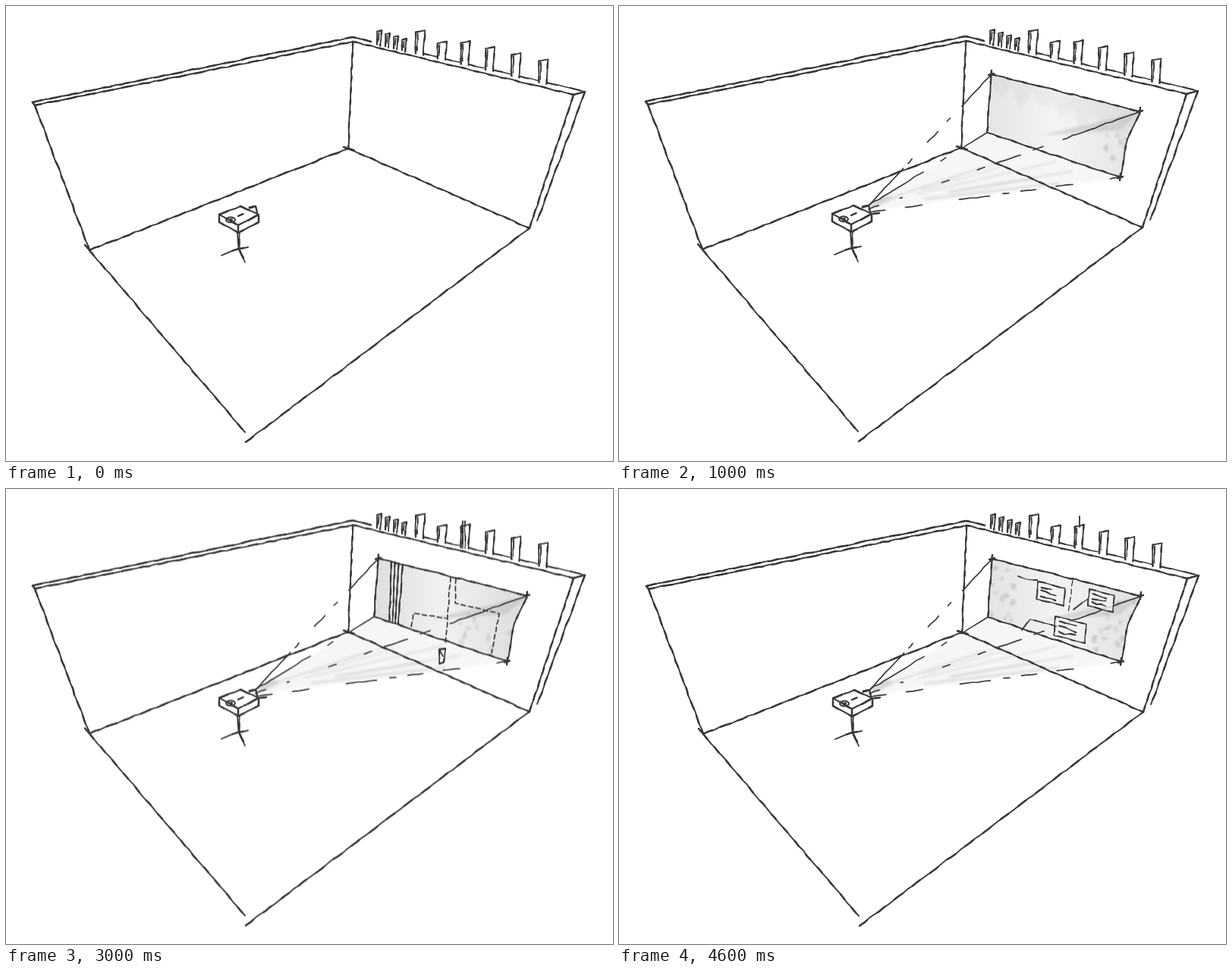
An HTML page for the animation above (5 s loop, 800 by 600 pixels).

```html
<!DOCTYPE html>
<html lang="en">
<head>
<meta charset="utf-8">
<title>Projector room sketch</title>
<style>
  html, body { margin: 0; width: 100%; height: 100%; overflow: hidden; background: #fff; }
  svg { display: block; width: 100vw; height: 100vh; }
  .ink { fill: none; stroke: #383838; stroke-linecap: round; stroke-linejoin: round; }
  .soft { filter: url(#blur); }
  .scene { opacity: 0; animation: show 5s step-end infinite; animation-delay: calc(var(--i) * 1s); }
  @keyframes show { 0% { opacity: 1; } 20%, 100% { opacity: 0; } }
</style>
</head>
<body>
<svg viewBox="0 0 800 600">
  <defs>
    <filter id="blur" x="-10%" y="-10%" width="120%" height="120%"><feGaussianBlur stdDeviation="1.6"/></filter>
    <clipPath id="screen"><path/></clipPath>
    <linearGradient id="wash">
      <stop offset="0" stop-color="#dedede"/><stop offset=".45" stop-color="#f1f1f1"/><stop offset="1" stop-color="#dcdcdc"/>
    </linearGradient>
    <g id="room"></g>
    <g id="beam"></g>
    <g id="rays" class="soft"></g>
    <g id="peaks" class="soft"></g>
  </defs>

  <g class="scene" style="--i:0"><use href="#room"/></g>

  <g class="scene" style="--i:1" transform="translate(0 -1)">
    <use href="#rays"/>
    <g id="hills" clip-path="url(#screen)"><use href="#peaks"/></g>
    <use href="#room"/><use href="#beam"/>
  </g>

  <g class="scene" style="--i:2" transform="translate(-1 -.5)">
    <use href="#rays" opacity=".35"/>
    <g id="patches" clip-path="url(#screen)"></g>
    <use href="#room"/><use href="#beam"/>
    <g id="bars"></g>
  </g>

  <g class="scene" style="--i:3" transform="translate(0 .5)">
    <use href="#rays"/>
    <g id="shade" clip-path="url(#screen)"><use href="#peaks"/><use href="#peaks" opacity=".6"/></g>
    <use href="#room"/><use href="#beam"/>
    <g id="plan"></g>
  </g>

  <g class="scene" style="--i:4" transform="translate(1 1)">
    <use href="#rays"/>
    <g id="dabs" clip-path="url(#screen)"></g>
    <use href="#room"/><use href="#beam"/>
    <g id="notes"></g>
  </g>
</svg>
<script>
const byId = id => document.getElementById(id);
let seed = 11;
const rand = () => (seed = seed * 16807 % 2147483647) / 2147483647;
const between = (a, b) => a + (b - a) * rand();
const mix = (p, q, t) => [p[0] + (q[0] - p[0]) * t, p[1] + (q[1] - p[1]) * t];
const shift = ([x, y], dx, dy) => [x + dx, y + dy];
const pathOf = points => "M" + points.map(p => p.map(v => v.toFixed(1)).join(" ")).join("L");

function add(id, tag, attrs) {
  const el = document.createElementNS("http://www.w3.org/2000/svg", tag);
  for (const key in attrs) el.setAttribute(key, attrs[key]);
  byId(id).append(el);
}

// A slightly shaky pen stroke through the points, with uneven pressure.
function ink(id, points, width = 1.8, dash = "") {
  const out = [points[0]];
  for (let i = 1; i < points.length; i++) {
    const a = points[i - 1], b = points[i];
    const n = Math.max(1, Math.round(Math.hypot(b[0] - a[0], b[1] - a[1]) / 8));
    for (let k = 1; k <= n; k++) {
      const wobble = k < n ? 0.6 : 0;
      out.push(shift(mix(a, b, k / n), between(-wobble, wobble), between(-wobble, wobble)));
    }
  }
  const d = pathOf(out);
  add(id, "path", { d, class: "ink", "stroke-width": width, "stroke-dasharray": dash });
  if (!dash) add(id, "path", { d, class: "ink", "stroke-width": width + 0.6,
    "stroke-dasharray": `${between(5, 14)} ${between(8, 18)}` });
}
const fill = (id, points, color, opacity = 1) =>
  add(id, "path", { d: pathOf(points), fill: color, opacity, class: "soft" });

// Corners of the room
const left = [38, 131], leftRim = [35, 127], leftFloor = [110, 322];
const back = [457, 47], backRim = [457, 41], backFloor = [451, 188];
const right = [748, 117], rightRim = [763, 113], rightFloor = [690, 293];
const front = [315, 562];

for (const line of [
  [leftRim, backRim, shift(backRim, 24, 6)], [leftRim, left, back], [left, leftFloor],
  [leftFloor, backFloor], [back, backFloor], [backFloor, rightFloor], [leftFloor, front],
  [shift(front, 1, 13), rightFloor], [back, right], [right, rightFloor], [right, rightRim],
  [rightRim, [700, 283]], [shift(leftFloor, -6, -7), leftFloor], [shift(backFloor, -6, -2), shift(backFloor, 8, 2)]
]) ink("room", line, 1.9);

// Pillars stand on the right rim, which shows between them.
const rimY = x => 41 + (x - 457) * 0.235;
function pillar(x, w, h) {
  const base = rimY(x) + 2, top = base - h;
  ink("room", [[x, base], [x, top], [x + w, top - w / 5], [x + w - 2, base + 2]]);
  ink("room", [[x + 2.5, top + 2], [x + 2, base - 4]], 1.2);
}
for (let i = 0; i < 4; i++) pillar(489 + 11 * i, 6, 17 - i);
for (let i = 0; i < 6; i++) {
  const place = n => 540 + 28 * n + 0.9 * n * n;
  const x = place(i), next = i < 5 ? place(i + 1) : rightRim[0];
  pillar(x, 12, i === 1 ? 20 : 28);
  ink("room", [[x + 11, rimY(x + 11)], [next - 2, rimY(next - 2)]], 1.5);
}

// Projector on its stand
const west = [281, 275], north = [309, 264], east = [333, 275], south = [306, 289];
const down = p => shift(p, 0, 10);
ink("room", [west, north, east, south, west, down(west), down(south), down(east), east], 2);
ink("room", [south, down(south)], 2);
add("room", "ellipse", { cx: 296, cy: 282, rx: 6, ry: 3.5, class: "ink", "stroke-width": 2 });
add("room", "circle", { cx: 297, cy: 282, r: 2, fill: "#383838" });
ink("room", [[306, 277], [313, 274]]);
ink("room", [[321, 266], [329, 264], [331, 272]], 2.4);
const hub = [307, 320];
for (const end of [[305, 298], [308, 298], [284, 329], [319, 318], [315, 338], [313, 332]]) ink("room", [hub, end]);

// Projected picture: u runs along it, v runs down it.
const TL = [491, 91], TR = [687, 140], BR = [661, 227], BL = [485, 168];
const on = (u, v) => mix(mix(TL, TR, u), mix(BL, BR, u), v);
const frame = [TL, TR, on(0.97, 0.45), BR, BL];
document.querySelector("#screen path").setAttribute("d", pathOf(frame));
ink("beam", [...frame, TL], 1.9);
for (const c of [TL, TR, BR]) {
  ink("beam", [shift(c, -4, 1), shift(c, 3, -1)]);
  ink("beam", [shift(c, 0, -5), shift(c, -1, 4)]);
}

// Light rays from the lens to the corners
const lens = [329, 264];
ink("beam", [lens, TL], 1.7, "67 9 8 30 20 18 6 22");
ink("beam", [lens, BL], 1.6, "85 27 8 23 60");
ink("beam", [shift(lens, 0, 5), TR], 1.7, "14 30 3 56 10 40 10 18 32 18 14 28 110");
ink("beam", [shift(lens, 2, 9), BR], 1.7, "20 27 22 50 40 18 8 16");
ink("beam", [shift(lens, 6, 11), shift(lens, 14, 10)]);

fill("rays", [lens, BL, BR, shift(lens, 8, 6)], "#eee", 0.5);
fill("rays", [lens, shift(lens, 22, -14), shift(lens, 34, -10), shift(lens, 6, 4)], "#bbb", 0.6);
for (let i = 0; i < 7; i++) {
  const end = mix(BL, BR, between(0.2, 1));
  add("rays", "path", { d: pathOf([mix(lens, end, between(0.1, 0.4)), mix(lens, end, between(0.6, 0.95))]),
    stroke: "#d4d4d4", "stroke-width": between(1, 4), opacity: 0.6 });
}

// Soft grey drawing on the screen
function wash(id, opacity) {
  add(id, "path", { d: pathOf(frame), fill: "url(#wash)", opacity });
  fill(id, [on(0.4, 0.75), TR, on(0.9, 0.35)], "#bbb", 0.5);
}
function spots(id, count, u0, u1, v0 = 0.1) {
  for (let i = 0; i < count; i++) {
    const [cx, cy] = on(between(u0, u1), between(v0, 0.95));
    add(id, "ellipse", { cx, cy, rx: between(2, 4), ry: between(2, 5), fill: "#b4b4b4", opacity: between(0.3, 0.6), class: "soft" });
  }
}
const ridge = [TL];
for (let i = 0; i <= 14; i++) ridge.push(on(i / 14, i % 2 ? between(0.3, 0.5) : between(0.12, 0.25)));
fill("peaks", [...ridge, TR], "#bbb", 0.55);
wash("hills", 0.8);
spots("hills", 10, 0.8, 1, 0.4);
wash("shade", 1);
spots("shade", 14, 0.6, 1, 0.4);
wash("dabs", 0.85);
spots("dabs", 15, 0, 0.2);
spots("dabs", 18, 0.75, 1);
fill("patches", [TL, on(0.22, 0), on(0.12, 0.4), on(0, 0.45)], "#bbb", 0.6);
fill("patches", [on(0.5, 0.05), on(0.7, 0.1), on(0.8, 0.5), on(0.6, 0.45)], "#aaa", 0.6);
fill("patches", [on(0.75, 0.4), TR, on(0.9, 0.5)], "#aaa", 0.6);

// Vertical stripes
for (let u = 0.03; u < 0.97; u += between(0.015, 0.055)) {
  const full = rand() < 0.5;
  const v0 = full ? 0 : between(0, 0.3), v1 = full ? 1 : between(0.7, 0.95);
  ink("bars", [on(u, v0), on(u, v1)], between(1.1, 2));
}

// Floor plan
for (let i = 0; i < 4; i++) ink("plan", [on(0.085 + i * 0.026, 0), on(0.115 + i * 0.022, 0.98)], 1.6);
for (const line of [
  [[586, 116], [579, 204]], [[593, 118], [592, 150], [650, 164], [640, 216]], [[534, 181], [537, 163], [580, 170]]
]) ink("plan", line, 1.7, "6 4");
ink("plan", [[571, 211], [579, 210], [577, 228], [571, 230], [571, 211], [576, 220]], 1.7);
for (const x of [602, 605]) ink("plan", [[x, 42], [x, 78]], 1.3);

// Pinned notes with scribbled lines
function note(x, y, w, h) {
  const at = (u, v) => [x + u * w - v * 2, y + u * w * 0.25 + v * h];
  const edge = [at(0, 0), at(1, 0), at(1, 1), at(0, 1), at(0, 0)];
  add("notes", "path", { d: pathOf(edge), fill: "#f2f2f2", opacity: 0.8 });
  ink("notes", edge, 1.4);
  for (let v = 0.25; v < 0.9; v += 0.25) {
    const end = between(0.6, 0.9), line = [];
    for (let u = 0.15; u < end; u += 0.18) line.push(at(u, v + between(-0.07, 0.07)));
    ink("notes", line, 1.5);
  }
}
note(551, 121, 36, 23);
note(619, 131, 33, 22);
note(574, 167, 41, 25);
for (const line of [
  [[525, 114], [536, 118], [550, 119]], [[530, 185], [541, 171], [575, 180]], [[598, 158], [617, 144]], [[606, 35], [606, 50]]
]) ink("notes", line, 1.2);
ink("notes", [[597, 120], [591, 162]], 1.3, "7 4");
</script>
</body>
</html>
```
